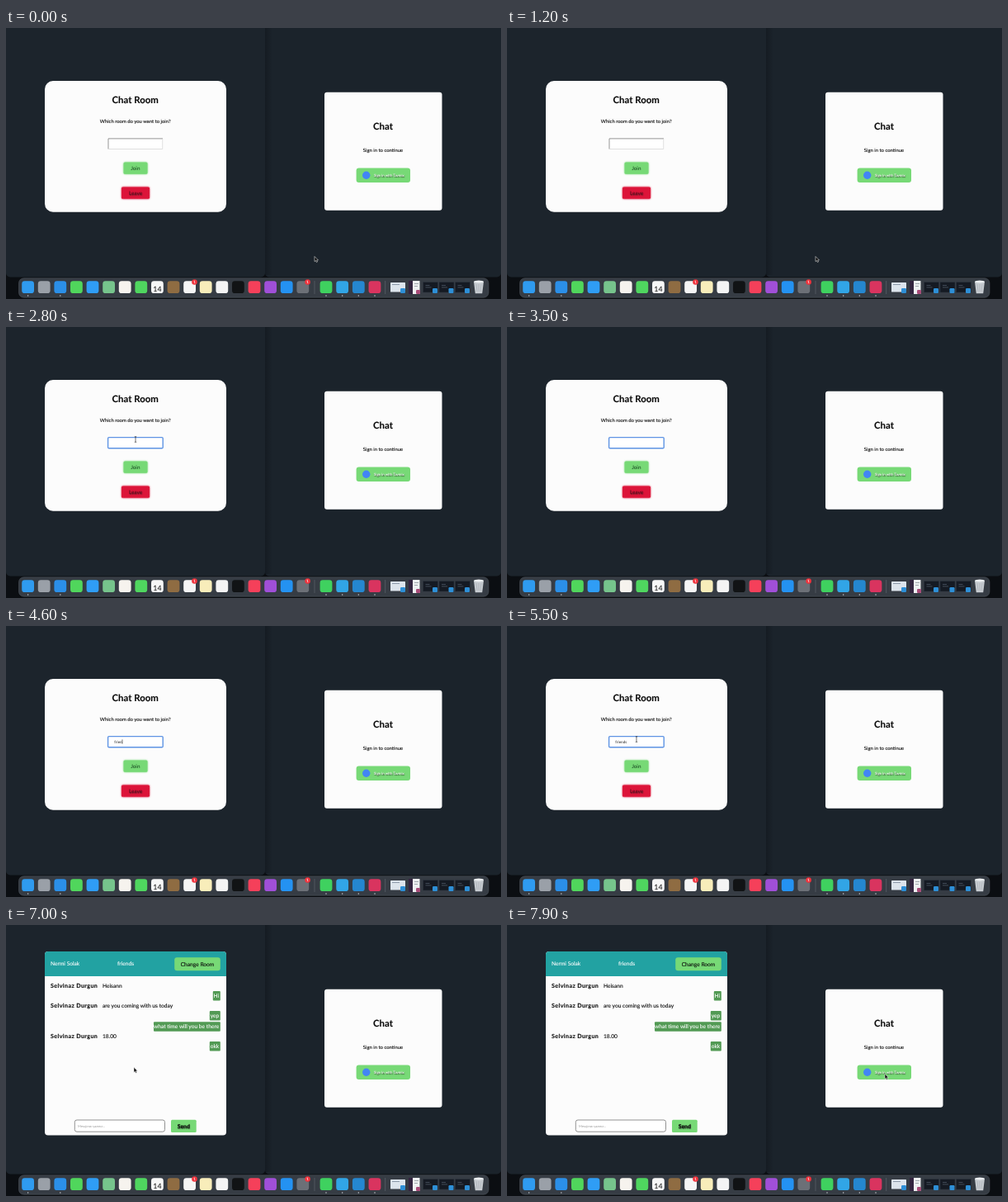
Write an HTML page that moves like this. It is 600 px wide and 328 px high and loops after 8 s.

```html
<!DOCTYPE html>
<html lang="en">
<head>
<meta charset="utf-8">
<title>Chat rooms</title>
<style>
  html, body { margin: 0; width: 100%; height: 100%; overflow: hidden; background: #0b0e12; }
  svg { display: block; width: 100%; height: 100%; }
  text { font-family: Lato, "Open Sans", sans-serif; font-size: 5.9px; fill: #0a0a0a; stroke: #0a0a0a; stroke-width: .1px; text-rendering: geometricPrecision; }
  .title { font-size: 11.4px; font-weight: 700; }
  .mid { text-anchor: middle; }
  .end { text-anchor: end; }
  .white { fill: #fff; stroke: #fff; }
  .bold { font-weight: 700; }
  .msg { font-size: 6.65px; }
  .name { font-size: 7.1px; letter-spacing: .4px; }
  .small { font-size: 4.6px; fill: #222; stroke: none; }
  .button { font-size: 6.4px; fill: #123d1b; stroke: none; }
  .shade { text-shadow: .5px .7px 1px #222a; }
</style>
</head>
<body>
<svg id="stage" viewBox="0 0 600 328" preserveAspectRatio="none">
  <defs>
    <linearGradient id="edge"><stop stop-color="#10151b" stop-opacity=".55"/><stop offset="1" stop-color="#10151b" stop-opacity="0"/></linearGradient>
    <filter id="glow" x="-30%" y="-50%" width="160%" height="200%"><feGaussianBlur stdDeviation="1.2"/></filter>
  </defs>
</svg>
<script>
const LOOP = 8000;
const stage = document.getElementById('stage');

const box = (x, y, w, h, fill, r = 0, more = '') =>
  `<rect x="${x}" y="${y}" width="${w}" height="${h}" rx="${r}" fill="${fill}" ${more}/>`;
const dot = (x, y, r, fill) => `<circle cx="${x}" cy="${y}" r="${r}" fill="${fill}"/>`;
const label = (x, y, words, cls = '', more = '') =>
  `<text x="${x}" y="${y}" class="${cls}" ${more}>${words}</text>`;
const group = (id, body) => `<g id="${id}">${body}</g>`;

const GREEN = '#77d976', CARD = '#fcfcfc';

function glowButton(x, y, w, h, color) {
  return box(x, y, w, h, color, 2, 'filter="url(#glow)"') + box(x, y, w, h, color, 1.5);
}

function desktop() {
  return box(0, -6, 314, 307.5, '#1c242c', 5) + box(314, -6, 286, 307.5, '#1b232b', 5) +
    box(314, 0, 9, 299, 'url(#edge)');
}

function signIn() {
  return box(386, 77.7, 142.5, 143, CARD, 3) +
    label(457, 123, 'Chat', 'title mid') +
    label(457, 150, 'Sign in to continue', 'mid') +
    box(424.6, 169.5, 65.4, 17.6, GREEN, 3) +
    dot(436.7, 178.3, 4.7, '#4285f4') +
    label(446, 180, 'Sign in with Tavmix', 'white shade', 'style="font-size:4.4px"');
}

function joinForm() {
  return box(47, 64, 220, 158.7, CARD, 10) +
    label(156.7, 90.7, 'Chat Room', 'title mid') +
    label(156.7, 115.4, 'Which room do you want to join?', 'mid') +
    group('field',
      box(123.5, 133.4, 66.5, 13.4, '#fff') +
      '<path d="M124 146.5V133.9H190" fill="none" stroke="#959595"/>' +
      '<path d="M124 146.5H189.7V134" fill="none" stroke="#d8d8d8" stroke-width=".8"/>') +
    group('focus', box(123.6, 133.6, 66.6, 13.2, '#fff', 1.2, 'stroke="#5f94e4" stroke-width="1.4"')) +
    label(131.3, 141.6, '', 'small', 'id="typed"') +
    group('caret', box(0, 137.4, .6, 5.2, '#111')) +
    group('join', glowButton(142.5, 162.6, 29, 14.2, GREEN)) +
    label(156.8, 171.9, 'Join', 'mid button') +
    glowButton(140, 192.6, 34, 14.2, '#dc1439') +
    box(140, 192.6, 34, 14.2, 'none', 1.5, 'stroke="#f2657c" stroke-width=".6" stroke-dasharray="1 1" opacity=".6"') +
    label(157, 202, 'Leave', 'mid button shade', 'style="fill:#4a0a18"');
}

function bubble(x, y, words, h = 11.6) {
  return box(x, y, 259.8 - x, h, '#529a54', 1) + label(258.2, y + 7.9, words, 'msg white end');
}

function received(y, words) {
  return label(54, y, 'Selvinaz Durgun', 'name bold') + label(117, y, words, 'msg');
}

function chat() {
  return box(47, 32, 220, 222.6, CARD, 4) +
    `<path d="M47 62V36a4 4 0 0 1 4-4H263a4 4 0 0 1 4 4V62Z" fill="#22a2a2"/>` +
    label(54, 49.3, 'Nermi Solak', 'msg white') +
    label(135, 49.3, 'friends', 'msg white') +
    box(204.2, 39.3, 55.6, 16, GREEN, 3) +
    label(232, 49.5, 'Change Room', 'msg mid') +
    received(75.7, 'Heisann') + bubble(250.8, 80, 'Hi') +
    received(99.7, 'are you coming with us today') + bubble(246.8, 104, 'yep') +
    bubble(179, 117.2, 'what time will you be there') +
    received(136.9, '18.00') + bubble(246.8, 141, 'okk') +
    box(83.3, 236, 109.2, 14.2, '#fff', 2.6, 'stroke="#777" stroke-width=".8"') +
    label(87, 244.6, 'Mesajınızı yazınız...', '', 'style="font-size:4px;fill:#999;stroke:none"') +
    box(200, 235.8, 30.7, 15.2, GREEN, 1.5) +
    label(215.3, 245.9, 'Send', 'mid bold shade', 'style="font-size:6.8px"');
}

function dock() {
  const apps = ['#2f9bf0', '#9aa0a8', '#2b8fe8', '#50d65c', '#2f9df5', '#76c48c', '#f6f3ee', '#4fd65f', '#f7f7f7',
    '#8f6c42', '#f5f5f5', '#f8edba', '#f4f4f4', '#111315', '#f5405a', '#a04fd8', '#2492f2', '#6c7077'];
  const extras = ['#3fd15f', '#31a5e6', '#2587d0', '#d9345f'];
  const icon = (x, color) => box(x - 7.4, 306.3, 14.8, 14.8, color, 3.4);
  const thumb = x => box(x, 307.5, 18, 12.5, '#151a23', .6, 'stroke="#2f3742" stroke-width=".5"') +
    box(x + 3, 311, 5, .8, '#4c5663') + box(x + 3, 313.5, 7, .8, '#4c5663') + box(x + 11.5, 315, 6, 6, '#2e8fd6', 1.2);
  return box(15.5, 302.8, 569.5, 23.4, '#363c44', 6, 'stroke="#555b63" stroke-width=".5"') +
    apps.map((c, i) => icon(26.6 + 19.6 * i, c)).join('') +
    extras.map((c, i) => icon(388 + 19.65 * i, c)).join('') +
    label(183.4, 319, '14', 'mid', 'style="font-size:8.8px;stroke:none"') +
    dot(228.5, 307.5, 3.3, '#f0323c') + dot(365.6, 307.5, 3.3, '#f0323c') +
    label(228.5, 309.2, '1', 'mid white', 'style="font-size:4.5px"') +
    label(365.6, 309.2, '1', 'mid white', 'style="font-size:4.5px"') +
    [373.7, 459.5].map(x => box(x, 306, .6, 16, '#646a72')).join('') +
    box(466, 308, 18, 11.5, '#dce4ec', .6) + box(468, 310, 9, 1, '#8d9aaa') + box(478, 315, 6, 6, '#2e8fd6', 1.2) +
    box(488, 306, 13.5, 16, '#eef0f2', .6) + box(488, 306, 5, 16, '#33243f') + box(495, 309, 5, 1, '#a0a5ac') +
    box(495, 312, 4, 1, '#a0a5ac') + box(497, 317, 5, 5, '#a84b78', 1.2) +
    [505.5, 525, 544.5].map(thumb).join('') +
    '<path d="M567 307H579L577.2 321.3H568.8Z" fill="#c7ccd1"/><ellipse cx="573" cy="307" rx="6" ry="1.4" fill="#edf0f2"/>' +
    '<path d="M570 310L571 319M573 310V319M576 310L575 319" stroke="#9ca3aa" stroke-width=".5"/>' +
    [26.6, 65.8, 388, 407.7, 427.3, 447].map(x => dot(x, 324, .75, '#c9cdd1')).join('');
}

function pointers() {
  const look = 'fill="#080808" stroke="#f4f4f4" stroke-width=".55" stroke-linejoin="round"';
  return group('arrow', `<path d="M0 0V6.1L1.4 4.9L2.4 7L3.5 6.5L2.6 4.4H4.4Z" ${look}/>`) +
    group('beam', '<path d="M-1.2-3.5Q0-3.5 0-2.7Q0-3.5 1.2-3.5M0-2.7V2.7M-1.2 3.5Q0 3.5 0 2.7Q0 3.5 1.2 3.5" fill="none" stroke="#111" stroke-width=".6"/>') +
    group('hand', '<path d="M-.7.4Q0-.5.7.4V3L3.4 3.7Q4.1 4 3.8 5.1L3.1 7.6H-.6L-2.4 4.7Q-2.4 3.8-1.5 4L-.7 4.7Z" fill="#fff" stroke="#111" stroke-width=".65" stroke-linejoin="round"/>');
}

stage.innerHTML += desktop() + signIn() + group('form', joinForm()) + group('chat', chat()) + dock() + pointers();

const part = id => document.getElementById(id);
const show = (id, on) => part(id).setAttribute('display', on ? 'inline' : 'none');

// Pointer stops: time, x, y
const stops = [[0, 374, 276.5], [1400, 374, 276.5], [2380, 157, 136], [5450, 157, 136],
  [5950, 155, 172.3], [7000, 155, 172.3], [7700, 458, 180.3], [LOOP, 458, 180.3]];
const keyTimes = [3700, 3900, 4100, 4300, 4500, 4800, 5000];

function pointerAt(t) {
  const i = stops.findIndex(s => s[0] > t);
  const [t0, x0, y0] = stops[i - 1], [t1, x1, y1] = stops[i];
  const p = (t - t0) / (t1 - t0), e = p * p * (3 - 2 * p);
  return [x0 + (x1 - x0) * e, y0 + (y1 - y0) * e];
}

function draw(t) {
  const [x, y] = pointerAt(t);
  const inChat = t >= 6600, focused = t >= 2800 && t < 6100;
  const overField = !inChat && x > 123 && x < 190 && y > 133 && y < 147;
  const overJoin = !inChat && x > 142 && x < 172 && y > 162 && y < 177;
  const hidden = t >= 3300 && t < 5450;

  show('form', !inChat);
  show('chat', inChat);
  show('focus', focused);
  show('field', !focused);

  const typed = part('typed');
  const count = keyTimes.filter(k => k <= t).length;
  typed.textContent = 'friends'.slice(0, count);
  const typing = t > 3650 && t < 5050;
  show('caret', focused && (typing || t % 1000 < 450));
  const width = inChat || !count ? 0 : typed.getComputedTextLength();
  part('caret').setAttribute('transform', `translate(${131.3 + width})`);
  part('join').setAttribute('transform', overJoin ? 'translate(157 169.7) scale(.95) translate(-157 -169.7)' : '');

  const kind = hidden ? '' : overField ? 'beam' : overJoin ? 'hand' : 'arrow';
  for (const id of ['arrow', 'beam', 'hand']) {
    show(id, id === kind);
    part(id).setAttribute('transform', `translate(${x} ${y})`);
  }
}

const start = performance.now();
function tick() {
  draw((performance.now() - start) % LOOP);
  requestAnimationFrame(tick);
}
tick();
</script>
</body>
</html>
```
